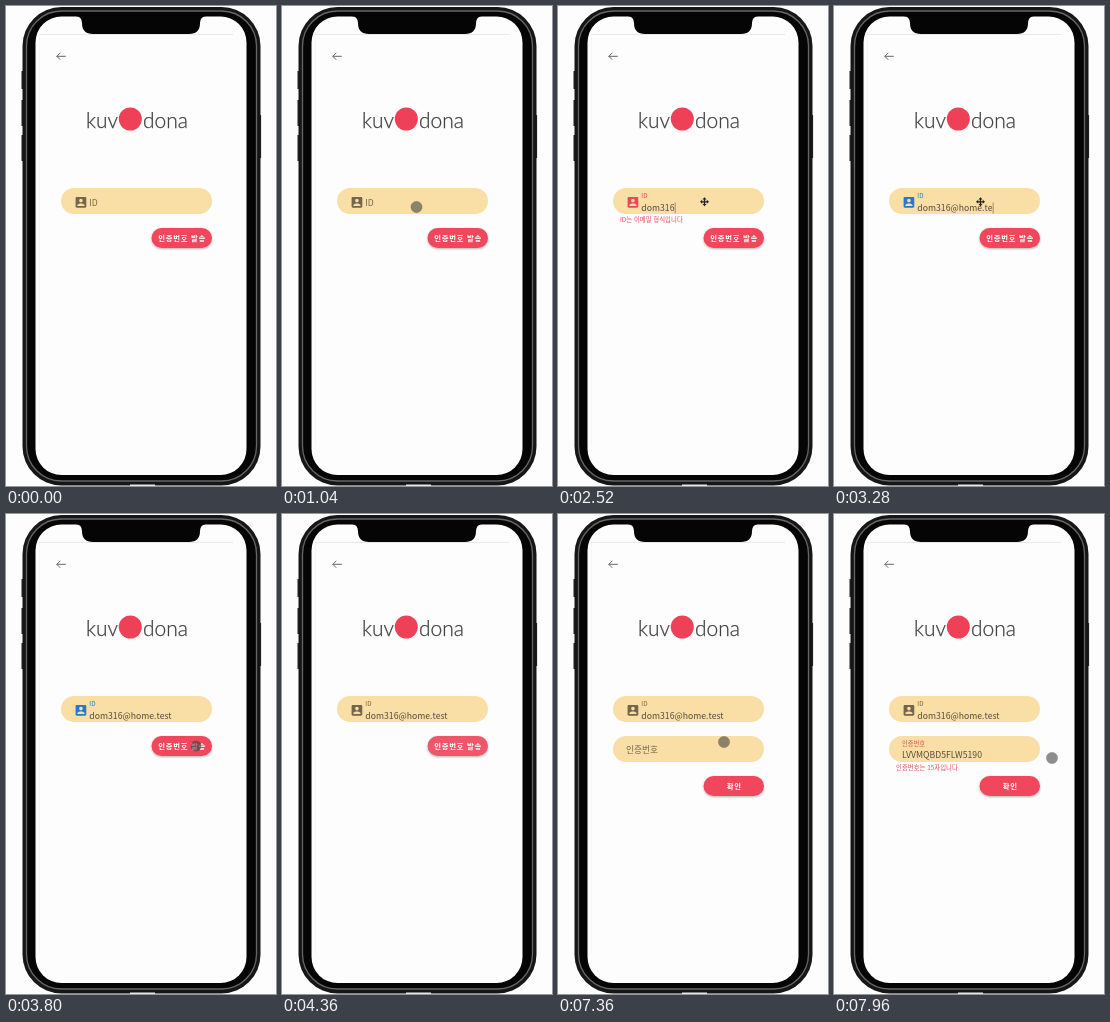
An HTML page for the animation above (8000 ms loop, 270 by 480 pixels).

```html
<!DOCTYPE html>
<html lang="ko">
<head>
<meta charset="utf-8">
<title>Sign-in form</title>
<style>
  html, body { margin: 0; width: 100%; height: 100%; overflow: hidden; background: #fdfdfd; }
  svg { display: block; width: 100vw; height: 100vh; }
  text { font-family: "Noto Sans CJK KR", "Noto Sans CJK", "Noto Sans", sans-serif; white-space: pre; }
  .word { font: 300 21px Lato, sans-serif; fill: #404040; stroke: #404040; stroke-width: .25; }
  .value { font-size: 8.7px; fill: #544b3b; }
  .label { font-size: 8.7px; }
  .error { font-size: 6.4px; font-weight: 500; fill: #e8485e; }
  .caption { font-size: 7.4px; font-weight: 700; letter-spacing: .7px; fill: #fff; text-anchor: middle; }
  .field { fill: #f9dfa6; }
</style>
</head>
<body>
<svg viewBox="0 0 270 480">
  <defs>
    <filter id="shadow" x="-20%" y="-30%" width="140%" height="180%">
      <feDropShadow dx="0" dy="1" stdDeviation="0.9" flood-color="#000" flood-opacity=".3"/>
    </filter>
  </defs>
  <rect width="270" height="480" fill="#fdfdfd"/>

  <!-- Phone -->
  <path d="M16.300 65v18M16.300 94v26M16.300 129v26M254.300 109v43" stroke="#222" stroke-width="1.600"/>
  <rect x="16.500" y="1" width="238" height="478.500" rx="39" fill="#161616"/>
  <rect x="20.500" y="5" width="230" height="470" rx="35" fill="#050505" stroke="#666668" stroke-width="1.300"/>
  <rect x="29.500" y="10.500" width="211" height="458.500" rx="26" fill="#fdfdfd"/>
  <path d="M70 10Q76 11 76 17Q76 28 87 28H183Q194 28 194 17Q194 11 200 10Z" fill="#050505"/>
  <path d="M33 28.500H227" stroke="#e8e8e8"/>
  <path d="M33.500 29V440" stroke="#f6f6f6"/>
  <rect x="124" y="478.500" width="25" height="1.500" fill="#e6e6e6"/>

  <!-- Header -->
  <path d="M59.800 50.300H50.600M54.300 46.800L50.800 50.300L54.300 53.800" fill="none" stroke="#666"/>
  <text class="word" x="112" y="122" text-anchor="end">kuv</text>
  <circle cx="124.300" cy="113" r="11.500" fill="#ee4158"/>
  <text class="word" x="137" y="122">dona</text>

  <!-- ID field -->
  <rect class="field" x="55" y="182" width="151" height="26" rx="13"/>
  <path id="icon" transform="translate(67.800 189.200) scale(.595)" d="M3 5v14c0 1.100.89 2 2 2h14c1.100 0 2-.9 2-2V5c0-1.100-.9-2-2-2H5c-1.110 0-2 .9-2 2zm12 4c0 1.660-1.340 3-3 3s-3-1.340-3-3 1.340-3 3-3 3 1.340 3 3zm-9 8c0-2 4-3.100 6-3.100s6 1.100 6 3.100v1H6v-1z"/>
  <text id="idLabel" class="label">ID</text>
  <text id="idValue" class="value" x="83.300" y="204.800"></text>
  <text id="idError" class="error" x="62" y="215.500">ID는 이메일 형식입니다</text>
  <rect id="caret" y="196.500" width=".7" height="11" fill="#544b3b" fill-opacity=".75"/>

  <!-- Code field -->
  <g id="codeField">
    <rect class="field" x="55" y="222" width="151" height="26" rx="13"/>
    <text id="codeLabel" class="label">인증번호</text>
    <text id="codeValue" class="value" x="68" y="244.300">LVVMQBD5FLW5190</text>
    <text id="codeError" class="error" x="62" y="255.800">인증번호는 15자입니다</text>
  </g>

  <g id="button">
    <rect id="buttonFace" x="145.500" y="222" width="60.500" height="20" rx="10" filter="url(#shadow)"/>
    <text id="caption" class="caption" x="176.200" y="234.700"></text>
  </g>

  <circle id="dot" r="5.700" fill="#3c3c3c" fill-opacity=".58" stroke="#3c3c3c" stroke-opacity=".2" stroke-width=".8"/>
  <g id="cross">
    <path d="M-3 0H3M0-3V3" stroke="#222" stroke-width="1.300"/>
    <path d="M-4.500 0l2.200-2v4zM4.500 0l-2.200-2v4zM0-4.500l-2 2.200h4zM0 4.500l-2-2.200h4z" fill="#222"/>
  </g>
</svg>
<script>
const LOOP = 8000, STEP = 40;
const EMAIL = "dom316@home.test";
const GREY = "#74664c", RED = "#e8485e", BLUE = "#2878cf";
const el = Object.fromEntries([...document.querySelectorAll("[id]")].map(n => [n.id, n]));

const T = { focus: 1160, type: 1800, resume: 2640, press: 3800, blur: 4080,
            leave: 4360, code: 5760, back: 7360, codeFocus: 7520, paste: 7680 };

// Pointer stops: time, x, y
const enterPath = [[80, 222, 302], [920, 134.500, 201], [1240, 134.500, 201], [1760, 146.500, 195.800],
                   [3440, 146.500, 195.800], [3760, 190, 232], [4000, 190, 232], [4320, 200, 251]];
const returnPath = [[7360, 166, 228], [7480, 145, 236], [7680, 145, 236], [7960, 218, 244]];

const clamp = v => Math.min(1, Math.max(0, v));
const ease = v => v * v * (3 - 2 * v);
const span = (t, a, b) => ease(clamp((t - a) / (b - a)));
const mix = (a, b, k) => a + (b - a) * k;
const show = (node, on) => node.setAttribute("visibility", on ? "inherit" : "hidden");
const move = (node, x, y, s = 1) => node.setAttribute("transform", `translate(${x} ${y}) scale(${s})`);

function along(path, t) {
  let i = 0;
  while (i < path.length - 2 && t >= path[i + 1][0]) i++;
  const [a, b] = [path[i], path[i + 1]];
  const k = span(t, a[0], b[0]);
  return [mix(a[1], b[1], k), mix(a[2], b[2], k)];
}

function typedCount(t) {
  if (t < T.type) return 0;
  if (t < T.resume) return Math.min(6, 1 + Math.floor((t - T.type) / 130));
  return Math.min(EMAIL.length, 7 + Math.floor((t - T.resume) / 89));
}

function floatLabel(node, x, low, high, k) {
  move(node, x, mix(low, high, k), mix(1, .72, k));
}

function drawId(t) {
  const count = typedCount(t);
  const focused = t >= T.focus && t < T.blur;
  const bad = count > 0 && count < 13;
  const tint = bad ? RED : focused ? BLUE : GREY;
  el.idValue.textContent = EMAIL.slice(0, count);
  floatLabel(el.idLabel, 83.300, 199.500, 192, span(t, T.focus, T.focus + 200));
  el.idLabel.setAttribute("fill", tint);
  el.icon.setAttribute("fill", tint);
  show(el.idError, bad);
  const blink = count > 0 || (t - T.focus) % 1000 < 500;
  show(el.caret, t >= T.focus && t < 3720 && blink);
  el.caret.setAttribute("x", 83.600 + (count ? el.idValue.getComputedTextLength() : 0));
}

function drawCode(t) {
  const pasted = t >= T.paste;
  show(el.codeField, t >= T.code);
  show(el.codeValue, pasted);
  show(el.codeError, pasted);
  floatLabel(el.codeLabel, 68, 239, 231.800, span(t, T.codeFocus, T.codeFocus + 160));
  el.codeLabel.setAttribute("fill", pasted ? "#d4524f" : GREY);
}

function drawButton(t) {
  const second = t >= T.code;
  const k = second ? 0 : span(t, T.press + 80, T.leave);
  move(el.button, 0, second ? 40 : 0);
  el.caption.textContent = second ? "확인" : "인증번호 발송";
  el.buttonFace.setAttribute("fill", `rgb(240 ${mix(70, 86, k)} ${mix(91, 105, k)})`);
}

function drawPointer(t) {
  const returned = t >= T.back;
  const on = returned || (t >= 80 && t < T.leave);
  const crossed = t >= 1760 && t < 3480;
  const [x, y] = along(returned ? returnPath : enterPath, t);
  const pressed = t >= T.press && t < T.press + 120;
  show(el.dot, on && !crossed);
  show(el.cross, on && crossed);
  move(el.dot, x, y, pressed ? .9 : 1);
  move(el.cross, x, y);
}

function draw(now) {
  const t = Math.floor((now % LOOP) / STEP) * STEP;
  drawId(t);
  drawCode(t);
  drawButton(t);
  drawPointer(t);
}

const start = performance.now();
function tick() {
  draw(performance.now() - start);
  requestAnimationFrame(tick);
}
tick();
</script>
</body>
</html>
```
